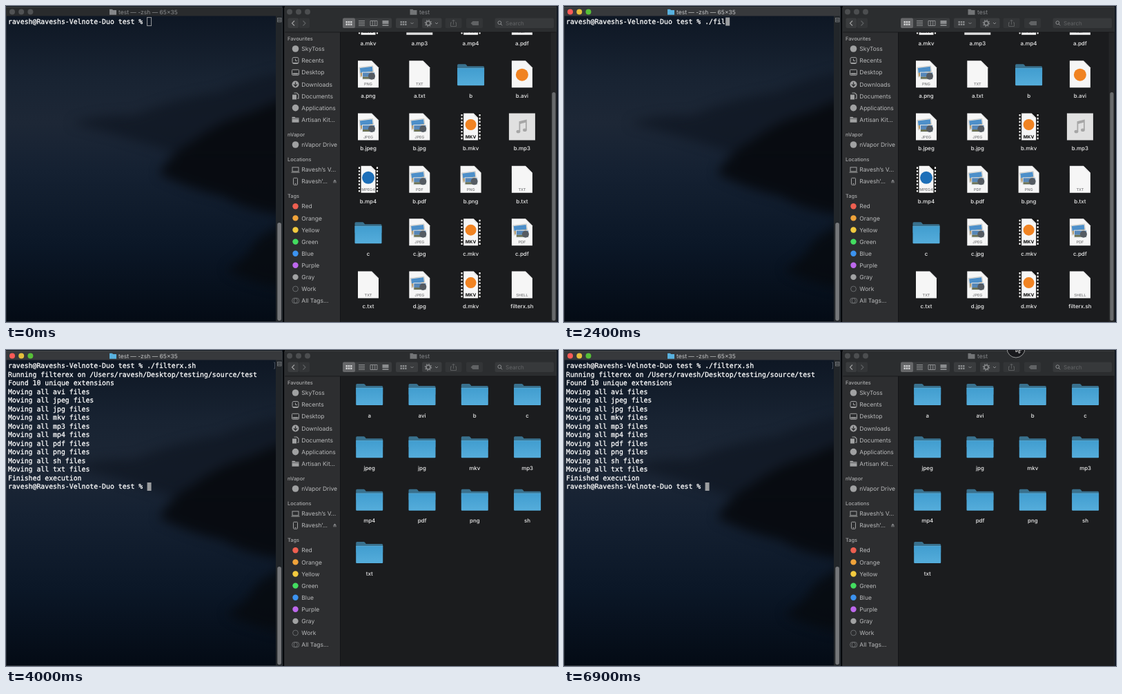
Write an HTML page that moves like this. It is 800 px wide and 458 px high and loops after 7000 ms.

```html
<!DOCTYPE html>
<html lang="en">
<head>
<meta charset="utf-8">
<title>Sorting files by extension</title>
<style>
html, body { margin: 0; width: 100%; height: 100%; overflow: hidden; background: #05070a; }
svg { display: block; width: 800px; height: 458px; }
text { font-family: Inter, "Open Sans", sans-serif; text-rendering: geometricPrecision; white-space: pre; }
.mono text { font: 9.83px "DejaVu Sans Mono", monospace; fill: #fff; stroke: #fff; stroke-width: .28px; }
.side { font-size: 8.5px; fill: #b9babb; }
.head { font-size: 7.4px; font-weight: 500; fill: #a9aaab; }
.label { font-size: 7.9px; font-weight: 500; fill: #ededed; text-anchor: middle; }
.kind { font-size: 5.5px; font-weight: 500; fill: #77787a; text-anchor: middle; }
.title { font-size: 8.5px; }
</style>
</head>
<body>
<svg id="stage" viewBox="0 0 800 458" xmlns="http://www.w3.org/2000/svg">
  <defs>
    <linearGradient id="sky" x2="0" y2="1">
      <stop offset="0" stop-color="#0e1724"/><stop offset=".2" stop-color="#182332"/>
      <stop offset=".35" stop-color="#1d2736"/><stop offset=".5" stop-color="#152132"/>
      <stop offset=".75" stop-color="#0b1727"/><stop offset="1" stop-color="#040b15"/>
    </linearGradient>
    <linearGradient id="blue" x2="0" y2="1">
      <stop offset="0" stop-color="#419dcf"/><stop offset="1" stop-color="#55addb"/>
    </linearGradient>
    <filter id="soft" x="-30%" y="-30%" width="160%" height="160%" color-interpolation-filters="sRGB">
      <feGaussianBlur stdDeviation="8"/>
    </filter>
    <clipPath id="termClip"><rect y="14" width="391" height="443"/></clipPath>
    <clipPath id="gridClip"><rect x="485" y="38" width="312" height="420"/></clipPath>
    <g id="folder">
      <path d="M-19.5 -12V-14Q-19.5 -15.5 -18 -15.5H-8Q-7 -15.5 -6 -14L-5 -12.5H18Q19.5 -12.5 19.5 -11V0H-19.5Z" fill="#39718e"/>
      <path d="M-19.5 -9.5H19.5V14.5Q19.5 15.5 18.5 15.5H-18.5Q-19.5 15.5 -19.5 14.5Z" fill="url(#blue)"/>
      <path d="M-19.5 -9.2H19.5" stroke="#62b4dc" stroke-width=".6"/>
    </g>
    <g id="page">
      <path d="M-15 -19.5H5L15 -9.5V19.5H-15Z" fill="#f6f6f6"/>
      <path d="M5 -19.5L15 -9.5Q9 -12.500 5 -19.5Z" fill="#dcdcdc"/>
    </g>
    <g id="photo">
      <g transform="rotate(-7)">
        <rect x="-12" y="-11" width="20" height="14" fill="#e9e6df" stroke="#b5b5b0" stroke-width=".5"/>
        <rect x="-11" y="-10" width="18" height="7" fill="#4d8fc9"/>
        <rect x="-11" y="-3" width="18" height="5" fill="#b29668"/>
      </g>
      <rect x="-9" y="-3" width="19" height="11" fill="#dfe4e8"/>
      <rect x="-8" y="-2" width="17" height="6" fill="#5687b8"/>
      <rect x="-8" y="4" width="17" height="3" fill="#6c7255"/>
      <circle cx="5" cy="3" r="5" fill="#555b62"/>
    </g>
    <g id="film">
      <rect x="-15" y="-19.5" width="30" height="39" fill="#141414"/>
      <path d="M-13 -18V19M13 -18V19" stroke="#eee" stroke-width="2.2" stroke-dasharray="2.6 2.2"/>
      <path d="M-10.5 -19.5H4L10.5 -13V19.5H-10.5Z" fill="#f6f6f6"/>
      <path d="M4 -19.5L10.5 -13Q5 -14 4 -19.5Z" fill="#dcdcdc"/>
    </g>
    <g id="song">
      <rect x="-19" y="-19.5" width="38" height="39" fill="#e0e0e0"/>
      <path d="M-3.500 7V-7L6 -9.500V4.500" fill="none" stroke="#a6a6a6" stroke-width="1.700"/>
      <path d="M-3.500 -5.500L6 -8" stroke="#a6a6a6" stroke-width="3"/>
      <ellipse cx="-5.500" cy="7" rx="2.900" ry="2.300" fill="#a6a6a6"/>
      <ellipse cx="4" cy="4.800" rx="2.900" ry="2.300" fill="#a6a6a6"/>
    </g>
  </defs>
</svg>
<script>
const stage = document.getElementById('stage');
const LOOP = 7000, STEP = 100;
const FOCUS = 600, ENTER = 3000, DONE = 3800, SORTED = 4000;
const CHAR = 5.92, ROW = 12.53;

const rect = (x, y, w, h, fill, extra = '') =>
  `<rect x="${x}" y="${y}" width="${w}" height="${h}" fill="${fill}" ${extra}/>`;
const dot = (x, y, r, fill, extra = '') => `<circle cx="${x}" cy="${y}" r="${r}" fill="${fill}" ${extra}/>`;
const line = (d, color, w = 1) => `<path d="${d}" fill="none" stroke="${color}" stroke-width="${w}"/>`;
const text = (x, y, s, cls, extra = '') => `<text x="${x}" y="${y}" class="${cls}" ${extra}>${s}</text>`;
const group = (id, body, extra = '') => `<g id="${id}" ${extra}>${body}</g>`;
const at = (x, y, body) => `<g transform="translate(${x} ${y})">${body}</g>`;
const use = id => `<use href="#${id}"/>`;
const smallFolder = (x, y, fill) =>
  `<path d="M${x} ${y}h4l1 1.200h5v6.800h-10z" fill="${fill}"/>`;

// Terminal window
const prompt = 'ravesh@Raveshs-Velnote-Duo test % ';
const command = './filterx.sh';
const kinds = ['avi', 'jpeg', 'jpg', 'mkv', 'mp3', 'mp4', 'pdf', 'png', 'sh', 'txt'];
const output = [
  'Running filterex on /Users/ravesh/Desktop/testing/source/test',
  'Found 10 unique extensions',
  ...kinds.map(k => `Moving all ${k} files`),
  'Finished execution',
  prompt
];
const shownAt = i => i < 2 ? 3100 + i * 100 : i < 12 ? 3300 + (i - 2) * 50 : DONE;
const typed = [[1700, 1], [1900, 2], [2100, 3], [2300, 4], [2400, 5], [2600, 12]];

function titleBar(id, bar, ink, icon, lights) {
  return group(id,
    rect(0, 1, 400, 13.5, bar) + line('M0 1.500H400', '#505255', .6) +
    lights.map((c, i) => dot(9 + i * 13.2, 8.5, 4, c)).join('') +
    smallFolder(150, 4.8, icon) +
    text(163, 11.7, 'test — -zsh — 65×35', 'title', `fill="${ink}"`));
}

function terminal() {
  const rows = [prompt, ...output]
    .map((s, i) => `<text x="3" y="${26 + i * ROW}">${s}</text>`).join('');
  return rect(0, 0, 401, 458, '#111820') +
    `<g clip-path="url(#termClip)">${rect(0, 14, 391, 443, 'url(#sky)')}
      <g filter="url(#soft)">
        <path d="M95 170Q135 156 185 158Q250 132 310 124Q350 105 420 90V215H250Q160 185 95 170Z" fill="#0f1621" opacity=".7"/>
        <path d="M222 243Q240 212 268 198Q310 166 350 156L420 126V306Q350 298 315 276Q262 264 222 243Z" fill="#080b10" opacity=".95"/>
        <path d="M320 382Q350 366 362 340L420 300V412Q350 402 320 382Z" fill="#080b10" opacity=".85"/>
      </g></g>` +
    rect(391, 14, 9, 443, '#22262a') + rect(393.3, 314, 5.6, 142, '#75777a', 'rx="2.8"') +
    rect(393.5, 17.5, 5.5, 5.5, '#33373b', 'stroke="#85888b" stroke-width=".7"') +
    line('M394 20.300H398.500', '#85888b', .7) +
    titleBar('idle', '#292b2d', '#8b8d8f', '#85878a', ['#505254', '#505254', '#505254']) +
    titleBar('active', '#37393c', '#c5c6c7', '#59b2df', ['#fc5b57', '#e5bf3c', '#57c038']) +
    group('rows', rows, 'class="mono"') +
    group('mark', line('M388 18H389.500V27H388', '#5d6570', .7)) +
    rect(0, 0, 6, 12, '#9b9d9f', 'id="caret"') +
    line('M.3 14V457.500H400.500V2', '#3b4045', .7);
}

// Finder-style file window
const tags = [['Red', '#ee5f50'], ['Orange', '#f0a33a'], ['Yellow', '#f3ca3f'], ['Green', '#43dd60'],
  ['Blue', '#3c93f0'], ['Purple', '#bd68ed'], ['Gray', '#a1a2a3']];
const GREY = '#a0a1a2', SIDE = '#2d2e30';
const icons = {
  disc: dot(0, 0, 4.8, GREY),
  clock: rect(-4.5, -4.5, 9, 9, 'none', `rx="2" stroke="${GREY}"`) + line('M0 -2.500V.5H2.500M-4 3.500H4', GREY),
  desk: rect(-5, -4, 10, 8, 'none', `rx="1" stroke="${GREY}"`) + rect(-4, 1, 8, 2, GREY),
  down: dot(0, 0, 5, GREY) + line('M0 -3V2.500M-2.500 0L0 2.800L2.500 0', SIDE, 1.2),
  docs: rect(-4.5, -2, 6, 7, GREY) + line('M-2 -4.500H2L4.500 -2V3.500H2.500', GREY, 1.2),
  folder: smallFolder(-5, -4, GREY) + line('M-5 -1.300H5', SIDE, .6),
  laptop: rect(-4.5, -3.5, 9, 6, 'none', `stroke="${GREY}"`) + line('M-6 3.800H6', GREY),
  phone: rect(-3, -5, 6, 10, 'none', `rx="1" stroke="${GREY}"`) + line('M-1 3.300H1', GREY)
};
const places = [
  ['disc', 'SkyToss', 62], ['clock', 'Recents', 79], ['desk', 'Desktop', 96.3], ['down', 'Downloads', 113.5],
  ['docs', 'Documents', 130.5], ['disc', 'Applications', 147.6], ['folder', 'Artisan Kit...', 164.7],
  ['disc', 'nVapor Drive', 201], ['laptop', 'Ravesh’s V...', 237.3], ['phone', 'Ravesh’...', 254.3]
];

function sidebar() {
  const heads = [['Favourites', 47], ['nVapor', 186], ['Locations', 222.5], ['Tags', 275.5]];
  const ring = (x, y) => dot(x, y, 3.9, 'none', 'stroke="#77797b" stroke-width=".8"');
  const tagY = i => 290.3 + i * 17.1;
  return rect(404, 38, 80.5, 420, SIDE) +
    heads.map(([s, y]) => text(408, y + 2.7, s, 'head')).join('') +
    places.map(([k, s, y]) => at(419.5, y, icons[k]) + text(428.3, y + 3.1, s, 'side')).join('') +
    line('M474 255.800H479', '#8b8d8f', .8) + '<path d="M474 254.500L476.500 251.500L479 254.500Z" fill="#8b8d8f"/>' +
    tags.map(([s, c], i) => dot(419.5, tagY(i), 4.2, c) + text(428.3, tagY(i) + 3.1, s, 'side')).join('') +
    ring(419.5, tagY(7)) + text(428.3, tagY(7) + 3.1, 'Work', 'side') +
    ring(418.5, tagY(8)) + ring(421, tagY(8)) + text(428.3, tagY(8) + 3.1, 'All Tags...', 'side');
}

function toolbar() {
  const ink = '#8a8c8e';
  const button = (x, w, fill = '#3a3c3e') => rect(x, 17.5, w, 14.5, fill, 'rx="2"');
  const tiles = (x, y) => [0, 1, 2, 3, 4, 5]
    .map(i => rect(x + i % 3 * 3.3, y + (i > 2) * 3.5, 2.4, 2.5, 'currentColor')).join('');
  const caret = x => line(`M${x} 24L${x + 2} 26L${x + 4} 24`, ink);
  return rect(404, 1, 394, 37, '#2b2d2f') + line('M404 1.500H798', '#46484a', .6) +
    [411, 424, 437].map(x => dot(x, 8.5, 4, '#4c4e50')).join('') +
    smallFolder(585.5, 4.8, '#737577') + text(599, 11.7, 'test', 'title', 'fill="#85878a"') +
    button(408.5, 15.5) + button(424.5, 15.5, '#333537') +
    line('M418 21.500L414.500 25L418 28.500', '#a0a1a2', 1.1) + line('M430.500 21.500L434 25L430.500 28.500', '#606264', 1.1) +
    button(488, 71) + button(488, 18, '#666769') +
    `<g color="#d0d1d2">${tiles(492.5, 22)}</g>` +
    line('M511 21.500H520M511 23.800H520M511 26H520M511 28.300H520', ink) +
    line('M528 21.500H538V28.500H528ZM531.300 21.500V28.500M534.700 21.500V28.500', ink) +
    rect(545.5, 21, 9, 5, ink) + line('M545.500 28H554.500', ink, 1.8) +
    button(565, 32) + `<g color="${ink}">${tiles(571.5, 22)}</g>` + caret(586.5) +
    button(603, 28.5) + dot(612, 25, 3, 'none', `stroke="${ink}" stroke-width="1.6"`) +
    dot(612, 25, 4.6, 'none', `stroke="${ink}" stroke-width="1.2" stroke-dasharray="1.5 2.1"`) + caret(622) +
    button(636.5, 24, '#333537') + line('M646 24H644.500V29.500H652.500V24H651M648.500 27V20M646.500 22L648.500 20L650.500 22', '#606264', .9) +
    button(667, 24, '#333537') + '<path d="M673.500 25L676.500 22H685V28H676.500Z" fill="#606264"/>' +
    rect(708.5, 17.5, 85.5, 14.5, '#37393b', 'rx="2.5"') + dot(715.3, 24.2, 2.4, 'none', 'stroke="#8b8d8f"') +
    line('M717 26L719.200 28.300', '#8b8d8f') + text(724, 28, 'Search', '', 'font-size="8.1" fill="#626466"') +
    line('M404 38H798', '#151618', .8);
}

const note = s => text(0, 16.6, s, 'kind');
const bigNote = s => text(0, 16.8, s, 'kind', 'style="font-size:6.4px;font-weight:800;fill:#222"');
const picture = s => use('page') + use('photo') + note(s);
const orange = dot(0, -3, 8, '#f08322');
const art = {
  png: picture('PNG'), jpg: picture('JPEG'), jpeg: picture('JPEG'), pdf: picture('PDF'),
  txt: use('page') + note('TXT'), sh: use('page') + note('SHELL'),
  avi: use('page') + dot(0, 1, 9, '#f08322'),
  mkv: use('film') + orange + bigNote('MKV'),
  mp4: use('film') + dot(0, -2.5, 9, '#1d6fb8') + note('MPEG4'),
  mp3: use('song'), folder: use('folder')
};

function grid(names, x0, y0, pitch) {
  return names.map((name, i) => {
    const x = x0 + i % 4 * pitch, y = y0 + Math.floor(i / 4) * 76.35;
    const ext = name.split('.')[1] || 'folder';
    return at(x, y + (ext === 'folder' ? 1 : 0), art[ext]) + text(x, y + 34.2, name, 'label');
  }).join('');
}

function browser() {
  const before = ('a.mkv a.mp3 a.mp4 a.pdf a.png a.txt b b.avi b.jpeg b.jpg b.mkv b.mp3 ' +
    'b.mp4 b.pdf b.png b.txt c c.jpg c.mkv c.pdf c.txt d.jpg d.mkv filterx.sh').split(' ');
  const after = ['a', 'avi', 'b', 'c', ...kinds.slice(1)];
  return rect(404, 0, 394, 458, '#1b1c1e') + sidebar() +
    `<g clip-path="url(#gridClip)">` +
    group('before', grid(before, 525, 22.3, 74.3) +
      rect(789.5, 38, 8, 420, '#242527') + rect(791.3, 125, 5.2, 331, '#686a6c', 'rx="2.6"')) +
    group('after', grid(after, 526.7, 63.5, 76.3)) + '</g>' +
    line('M484.500 38V458', '#101113', .8) + toolbar() +
    line('M403.700 2V458M798 2V458', '#46494c', .6) + rect(798.4, 0, 1.6, 458, '#0e1622');
}

const pointer =
  group('arrow', '<path d="M0 0V11L2.600 8.700L4.300 12.500L6 11.700L4.400 8H8Z" fill="#111" stroke="#f2f2f2" stroke-width=".9"/>', 'transform="translate(0 -6)"') +
  group('beam', ['#111', '#e8e8e8'].map((c, i) =>
    line('M-2.500 -5.500Q0 -5.500 0 -3.500Q0 -5.500 2.500 -5.500M0 -4V4M-2.500 5.500Q0 5.500 0 3.500Q0 5.500 2.500 5.500M-1.500 1.500H1.500', c, i ? 1 : 2.4)).join(''));

stage.insertAdjacentHTML('beforeend', terminal() + browser() +
  group('mouse', dot(0, 0, 13, 'rgba(10,10,12,.55)', 'id="click" stroke="#b5b6b7" stroke-width=".8"') + pointer));

const $ = id => document.getElementById(id);
const show = (node, on) => node.setAttribute('display', on ? 'inline' : 'none');
const parts = Object.fromEntries(['idle', 'active', 'mark', 'caret', 'before', 'after',
  'mouse', 'click', 'arrow', 'beam'].map(id => [id, $(id)]));
const rowNodes = [...$('rows').children];

const HOME = [342, 20], EXIT = [655, -2];
const ease = (t, a, b) => {
  const k = Math.min(1, Math.max(0, (t - a) / (b - a)));
  return k * k * (3 - 2 * k);
};

function drawMouse(t) {
  const k = t < 3000 ? ease(t, 0, 500) : 1 - ease(t, 6100, 6800);
  const [x, y] = EXIT.map((v, i) => v + (HOME[i] - v) * k);
  const overText = x < 391 && y > 14;
  show(parts.mouse, t >= 100 && t < 1700 || t >= 5700);
  show(parts.beam, overText);
  show(parts.arrow, !overText);
  show(parts.click, t === 500 || t >= 6800);
  parts.mouse.setAttribute('transform', `translate(${x} ${y})`);
}

function draw(now) {
  const t = Math.floor(now % LOOP / STEP) * STEP;
  const focused = t >= FOCUS;
  const count = typed.reduce((n, [when, chars]) => t >= when ? chars : n, 0);
  const lines = output.filter((_, i) => t >= shownAt(i)).length;

  show(parts.idle, !focused);
  show(parts.active, focused);
  show(parts.mark, t >= ENTER);
  show(parts.before, t < SORTED);
  show(parts.after, t >= SORTED);

  rowNodes[0].textContent = prompt + command.slice(0, count);
  rowNodes.forEach((node, i) => show(node, i <= lines));

  let row = 0, col = prompt.length + count;
  if (t >= DONE) [row, col] = [output.length, prompt.length];
  else if (t >= ENTER) [row, col] = [lines + 1, 0];
  const caret = parts.caret;
  caret.setAttribute('x', 3.3 + col * CHAR);
  caret.setAttribute('y', 16.6 + row * ROW);
  caret.setAttribute('fill', focused ? '#9b9d9f' : 'none');
  caret.setAttribute('stroke', focused ? 'none' : '#9b9d9f');

  drawMouse(t);
  requestAnimationFrame(draw);
}
draw(performance.now());
</script>
</body>
</html>
```
